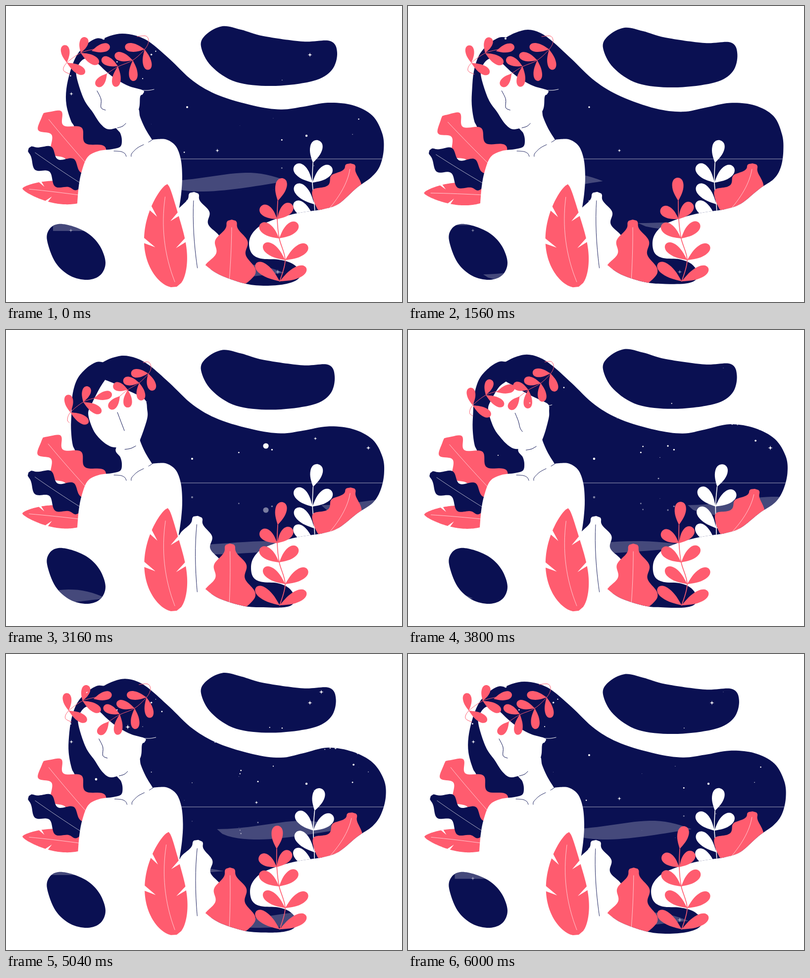
An HTML page with a canvas that plays this animation: 800x600 px, repeating every 6.04 s.

```html
<!DOCTYPE html>
<html lang="en">
<head>
<meta charset="utf-8">
<title>Night hair</title>
<style>
html, body { margin: 0; width: 100%; height: 100%; overflow: hidden; background: #fff; }
canvas { display: block; width: 800px; height: 600px; }
</style>
</head>
<body>
<canvas id="stage" width="800" height="600"></canvas>
<script>
const ctx = document.getElementById('stage').getContext('2d');
const NAVY = '#0a1052', CORAL = '#ff5c6f', WHITE = '#fff';
const MIST = 'rgba(255,255,255,.24)', FINE = 'rgba(255,255,255,.75)';
const LOOP = 6040, { PI, sin, cos, sqrt, min, max, hypot, atan2 } = Math, TAU = PI * 2;

const pts = s => s.trim().split(/\s+/).map(p => p.split(',').map(Number));
const mod = (a, n) => ((a % n) + n) % n;
const lerp = (a, b, k) => a + (b - a) * k;
const mix = (a, b, k) => a.map((p, i) => p.map((v, j) => lerp(v, b[i][j], k)));
const polar = ([x, y], angle, len) => [x + len * cos(angle), y + len * sin(angle)];
const range = (n, f) => Array.from({ length: n }, (_, i) => f(i));
function ramp(t, from, to) {
  const u = max(0, min(1, (t - from) / (to - from)));
  return u * u * (3 - 2 * u);
}
function seeded(seed) {
  return () => (seed = (seed * 16807) % 2147483647) / 2147483647;
}

// Smooth curve through points; a doubled point makes a corner.
function spline(p, closed = true) {
  const path = new Path2D(), n = p.length;
  const get = i => closed ? p[mod(i, n)] : p[max(0, min(n - 1, i))];
  path.moveTo(...p[0]);
  for (let i = 0; i < (closed ? n : n - 1); i++) {
    const [a, b, c, d] = [get(i - 1), get(i), get(i + 1), get(i + 2)];
    if (b[0] === c[0] && b[1] === c[1]) continue;
    path.bezierCurveTo(b[0] + (c[0] - a[0]) / 6, b[1] + (c[1] - a[1]) / 6,
      c[0] - (d[0] - b[0]) / 6, c[1] - (d[1] - b[1]) / 6, c[0], c[1]);
  }
  if (closed) path.closePath();
  return path;
}
function polygon(p) {
  const path = new Path2D();
  p.forEach(q => path.lineTo(...q));
  path.closePath();
  return path;
}
function fill(path, color) { ctx.fillStyle = color; ctx.fill(path); }
function stroke(p, color, width = 1) {
  ctx.strokeStyle = color;
  ctx.lineWidth = width;
  ctx.lineCap = 'round';
  ctx.stroke(spline(p, false));
}
function scope(draw) { ctx.save(); draw(); ctx.restore(); }

// Rotation around a root, n swings per loop, at rest when t is 0.
function sway(t, x, y, amp, n, phase, draw) {
  scope(() => {
    ctx.translate(x, y);
    ctx.rotate(amp * (cos(TAU * (n * t / LOOP - phase)) - cos(TAU * phase)));
    ctx.translate(-x, -y);
    draw();
  });
}

// A leaf is a curved rib (tip, bend, end) with a half-width rule.
function rib([[ax, ay], [bx, by], [cx, cy]]) {
  return (s, w = 0) => {
    const r = 1 - s;
    const dx = r * (bx - ax) + s * (cx - bx), dy = r * (by - ay) + s * (cy - by), d = hypot(dx, dy);
    return [r * r * ax + 2 * r * s * bx + s * s * cx - w * dy / d,
            r * r * ay + 2 * r * s * by + s * s * cy + w * dx / d];
  };
}
function makeLeaf(curve, half, slits = []) {
  const points = pts(curve), at = rib(points), n = 60;
  const len = hypot(points[2][0] - points[0][0], points[2][1] - points[0][1]);
  const width = s => half(s, len);
  const side = k => range(n + 1, i => at(i / n, k * width(i / n)));
  const cut = ([s, k]) => polygon([
    at(s - .03, k * width(s) * 1.15), at(s + .09, k * width(s) * .5), at(s + .03, k * width(s) * 1.15)]);
  return {
    body: polygon([...side(1), ...side(-1).reverse()]),
    vein: range(9, i => at(lerp(.12, .95, i / 8))),
    cuts: slits.map(cut)
  };
}
const rounded = u => sqrt(max(0, 1 - (1 - min(1, u)) ** 2));
const lobed = (width, grow, wave, peak, period, nose) => (s, len) => {
  const d = s * len;
  return (width + grow * d + wave * cos(TAU * (d - peak) / period)) * rounded(d / nose) * rounded((len - d) / 30);
};
const blade = width => s => width * sqrt(max(0, sin(PI * s ** 1.4)));
const oakLobes = lobed(12, .34, 6, 43, 55, 10);

const leaves = {
  feather: makeLeaf('33,370 90,375 168,386', blade(23), [[.27, -1], [.4, 1]]),
  ruffle: makeLeaf('76,217 118,270 185,345', lobed(16, .18, 10, 80, 57, 24)),
  dark: makeLeaf('46,288 100,327 155,362', lobed(17, .1, 8, 35, 52, 16)),
  pale: makeLeaf('380,377 374,450 388,540', oakLobes),
  front: makeLeaf('326,361 303,470 345,569', blade(42), [[.26, -1], [.54, -1], [.22, 1], [.5, 1]]),
  oak: makeLeaf('456,433 456,500 450,568', oakLobes),
  shore: makeLeaf('696,319 694,368 640,425', oakLobes)
};
function leaf({ body, vein, cuts }, color, veinColor = FINE) {
  fill(body, color);
  stroke(vein, veinColor, .9);
  cuts.forEach(c => fill(c, WHITE));
}

function petal([x, y], angle, len, width, color) {
  const h = width / 2;
  scope(() => {
    ctx.translate(x, y);
    ctx.rotate(angle);
    ctx.beginPath();
    ctx.moveTo(0, 0);
    for (const k of [h, -h]) {
      ctx.moveTo(0, 0);
      ctx.bezierCurveTo(len * .22, k * .5, len * .42, k, len * .68, k);
      ctx.bezierCurveTo(len * .9, k, len, k * .5, len, 0);
    }
    ctx.fillStyle = color;
    ctx.fill();
  });
}

// Top petal and pairs along a stem; the bend fades quickly towards the root.
function sprig(stem, color, width, len, grow, left, right, turn, bend = 0) {
  const [top, root] = [stem[0], stem[stem.length - 1]];
  const h = stem.map(p => ((root[1] - p[1]) / (root[1] - top[1])) ** 4);
  const nodes = stem.map(([x, y], i) => [x + 12 * bend * h[i], y]);
  stroke(nodes, color, 1.6);
  petal(nodes[0], -1.35 + bend, 47, width, color);
  nodes.slice(1).forEach((p, i) => {
    const tilt = bend * h[i + 1], size = len + grow * i;
    petal(p, left + tilt, size, width, color);
    petal(p, right + turn * i + tilt, size, width, color);
  });
}
const coralStem = pts('549,395 548,432 552,471 564,515 553,558');
const paleStem = pts('620,318 619,358 623,402 625,440');

const hairPts = pts(`195,67 195,67 212,60 235,56 262,60 290,73 330,107 378,152 430,181 500,201 555,209
  600,204 650,196 700,201 740,222 760,258 763,292 755,325 738,347 708,369 672,401 640,412 600,418
  560,427 518,443 497,462 491,482 497,502 515,512 550,514 578,522 596,540 588,555 562,564 520,567
  480,562 430,544 400,523 400,523 340,480 165,330 141,252 131,232 122,200 122,168 130,132
  143,100 162,78 182,66`);
const islePts = pts(`394,82 404,58 437,41 475,48 520,61 600,72 655,71 669,95 658,130 620,152 540,162 465,154 415,122`);
const pondPts = pts(`83,475 88,452 106,442 136,447 167,462 190,487 201,520 191,545 165,555 130,547 100,520`);
const bodyPts = pts(`222,240 231,258 234,272 231,285 215,290 187,294 165,306 153,335 147,365 144,400 144,400
  160,480 160,480 390,540 390,540 349,415 349,415 354,380 356,345 353,310 343,284 325,271 305,270
  295,271 295,271 281,248 271,225 267,208 250,205`);
const collar = ['218,294 232,295 240,299 243,305', '253,305 254,299 265,288 278,281', '288,276 296,271'].map(pts);

// The head in profile and turned to the front.
const faceA = pts(`183,114 183,114 205,135 225,150 250,163 277,171 276,179 271,184 267,212 242,238
  210,250 192,240 175,215 157,188 142,140 147,118 162,106`);
const faceB = pts(`200,101 200,101 222,110 245,122 268,133 282,143 285,160 285,180 271,222 262,236
  222,238 205,233 188,219 175,200 166,170 173,150 188,120`);
const headLines = [
  [NAVY, '184,172 192,189 192,206 201,211', '225,167 231,183 236,196 239,204'],
  [NAVY, '225,247 235,244 242,238', '240,242 252,240 262,235'],
  [WHITE, '277,171 288,171 299,169', '278,145 282,146 284,145'],
  [CORAL, '129,138 116,130 123,115 151,95 180,87', '128,188 124,182 130,167 156,146 182,137'],
  [CORAL, '204,137 226,123 256,110 280,88 288,72 283,61 265,62', '230,134 246,121 269,107 288,88 293,75 288,65 277,66']
].map(([c, a, b]) => [c, pts(a), pts(b)]);

// Clouds drift left and keep their shape: entry time and x, y, length, rise, drop.
const DRIFT = .112;
const clouds = [[2017, 765, 355, 254, 17, 21], [355, 600, 440, 365, 12, 15], [3507, 605, 541, 241, 17, 14]];
const pondCloud = [1042, 210, 544, 230, 18, 14];
function drawCloud([start, x, y, len, rise, drop], t) {
  const left = x - DRIFT * mod(t - start, LOOP), n = 24;
  const top = range(n, i => [left + len * i / n, y - rise * sin(PI * (i / n) ** 1.8)]);
  const low = range(n, i => [left + len * (1 - i / n), y + drop * sin(PI * (1 - i / n) ** .6)]);
  fill(polygon([...top, ...low]), MIST);
}

// Bright stars: x, y, radius, time of full light; faint ones are scattered.
const rnd = seeded(71);
const brightStars = pts(`525,235,5.6,2750 625,220,3.5,2700 732,239,4.8,4000 637,77,4.6,4900 614,99,4.5,5300
  246,148,5,4800 132,178,4,5700 506,301,3.5,4750 427,293,4,6750 131,455,4,6750 376,261,2.3,4000
  549,539,5,6750 607,263,2.2,5700 182,254,2.4,4800 197,66,2.4,6750 366,205,2,6750`);
const faintStars = range(44, () => [lerp(130, 765, rnd()), lerp(60, 300, rnd()), lerp(.8, 1.9, rnd()), lerp(3700, 6300, rnd())]);

function star(x, y, r, full, alpha) {
  ctx.globalAlpha = alpha;
  ctx.beginPath();
  if (full >= 3.5 && full <= 5) {
    range(8, i => ctx.lineTo(...polar([x, y], i * TAU / 8, i % 2 ? r * .3 : r)));
  } else ctx.arc(x, y, r, 0, TAU);
  ctx.fill();
  ctx.globalAlpha = 1;
}
function drawStars(t) {
  ctx.fillStyle = WHITE;
  for (const [x, y, r, peak] of [...brightStars, ...faintStars]) {
    const u = (mod(t - peak + LOOP / 2, LOOP) - LOOP / 2) / 2300 + .5;
    if (u <= 0 || u >= 1) continue;
    const size = r * min(1, 2.2 * sin(PI * u));
    star(x, y, size, r, y > 310 ? .5 : 1);
    if (x > 355 && y > 200 && y < 289) star(x, 600 - y, size, r, .45);
  }
}

// Soft pushes shift nearby points: x, y, radius, dx, dy.
function warp(points, pushes) {
  return points.map(([px, py]) => pushes.reduce(([qx, qy], [x, y, r, dx, dy]) => {
    const g = Math.exp(-((px - x) ** 2 + (py - y) ** 2) / (r * r));
    return [qx + dx * g, qy + dy * g];
  }, [px, py]));
}
function hairShape(breath, rise, wave) {
  const swell = rise ** .6;
  return spline(warp(hairPts, [
    [122, 180, 50, 11 * rise, 0],
    [235, 56, 45, 6 * breath + 2 * rise, -5 * breath - 4 * rise],
    [515, 200, 80, 0, 4 * breath + 2 * wave + 1],
    [645, 196, 60, 0, 4 * (wave - breath)],
    [764, 280, 60, -5 * wave, 3 * wave],
    [728, 355, 35, 3 * swell, 4 * swell],
    [491, 480, 35, 4 * rise, 0],
    [596, 542, 35, -12 * swell, 3 * rise],
    [520, 567, 50, 0, -5 * rise]
  ]));
}

function drawWreath(turn) {
  const bud = (p, angle, len) => petal(p, angle, len, 17.5, CORAL);
  const left = mix(pts('123,115 151,95 173,91'), pts('130,167 156,146 177,139'), turn);
  left.slice(0, 2).forEach((p, i) => {
    bud(p, -1.71 + .44 * i, 36 - 3 * i);
    bud(p, .53, 42);
  });
  bud(left[2], -.26, 38);
  const right = mix(pts('226,122 256,110 280,88'), pts('246,121 269,107 287,88'), turn);
  const scale = 1 - .14 * turn;
  right.forEach((p, i) => {
    bud(p, 1.68 - .15 * i - .1 * turn, 42 * scale);
    bud(p, PI + .45 - .15 * i - .14 * turn, (36 + 2 * i) * scale);
  });
  bud(mix([[204, 137]], [[230, 134]], turn)[0], 2.25, 33);
}

function drawHead(turn, breath) {
  scope(() => {
    ctx.translate(5 * breath, 0);
    fill(spline(mix(faceA, faceB, turn)), WHITE);
    for (const [color, a, b] of headLines) stroke(mix(a, b, turn), color);
    drawWreath(turn);
  });
}

function draw(t) {
  const breath = (1 - cos(TAU * 2 * t / LOOP)) / 2;
  const rise = sin(PI * t / LOOP), wave = sin(TAU * t / LOOP);
  const turn = ramp(t, 1500, 2600) * (1 - ramp(t, 3300, 4750));
  const hair = hairShape(breath, rise, wave);
  const isle = spline(warp(islePts, [[665, 95, 50, -5 * rise, 0]]).map(([x, y]) => [x, y + 3 * wave]));
  const pond = spline(pondPts);
  const sky = new Path2D();
  [hair, isle, pond].forEach(p => sky.addPath(p));

  ctx.fillStyle = WHITE;
  ctx.fillRect(0, 0, 800, 600);
  fill(hair, NAVY);
  fill(isle, NAVY);
  scope(() => {
    ctx.clip(hair);
    clouds.forEach(c => drawCloud(c, t));
    ctx.fillStyle = 'rgba(255,255,255,.6)';
    ctx.fillRect(340, 309.5, 440, 1);
  });

  sway(t, 143, 385, .042, 6, 0, () => leaf(leaves.feather, CORAL));
  sway(t, 160, 320, .035, 6, 0, () => leaf(leaves.ruffle, CORAL));
  sway(t, 148, 352, .022, 6, 0, () => leaf(leaves.dark, NAVY));

  scope(() => {
    ctx.translate(2 * breath, 0);
    fill(spline(bodyPts), WHITE);
    collar.forEach(c => stroke(c, NAVY, .9));
  });
  fill(pond, NAVY);
  scope(() => {
    ctx.clip(pond);
    drawCloud(pondCloud, t);
    ctx.fillStyle = MIST;
    ctx.fillRect(95 - 25 * rise, 430, 70, 26 - 16 * rise);
  });
  drawHead(turn, breath);
  scope(() => { ctx.clip(sky); drawStars(t); });

  scope(() => {
    ctx.clip(hair);
    sway(t, 625, 400, .0275, 4, .5, () => sprig(paleStem, WHITE, 25, 50, 5, PI + .8, -.7, 0));
    sway(t, 640, 412, .025, 4, .5, () => leaf(leaves.shore, CORAL));
  });
  sway(t, 390, 525, .03, 3, .45, () => leaf(leaves.pale, WHITE, NAVY));
  sway(t, 345, 568, .0217, 3, .3, () => leaf(leaves.front, CORAL));
  scope(() => {
    ctx.clip(hair);
    sway(t, 450, 555, .016, 3, .05, () => leaf(leaves.oak, CORAL));
  });
  sprig(coralStem, CORAL, 23, 42, 6, PI + .64, -.8, .11, -.25 * breath);
}

const began = performance.now();
function tick() {
  draw((performance.now() - began) % LOOP);
  requestAnimationFrame(tick);
}
tick();
</script>
</body>
</html>
```
